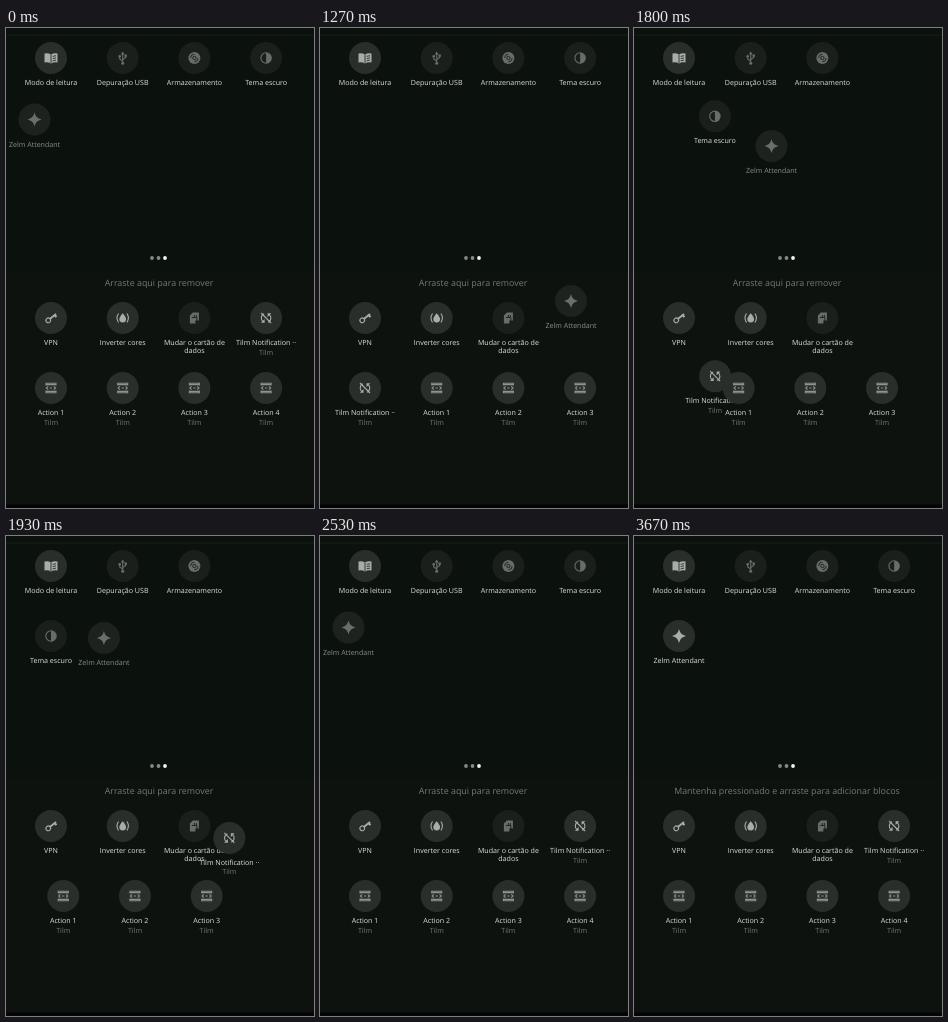
Recreate the animation shown at these times as an HTML page. Size 308 by 480 pixels, loop 5.07 s.

```html
<!DOCTYPE html>
<html lang="pt">
<head>
<meta charset="utf-8">
<title>Editor de blocos</title>
<style>
  html, body { margin: 0; width: 100%; height: 100%; overflow: hidden; background: #0b110c; }
  svg { display: block; width: 308px; height: 480px; }
  text { font-family: "Open Sans", "Noto Sans", sans-serif; text-anchor: middle; text-rendering: geometricPrecision; }
  .label { font-size: 7.1px; fill: #dde0dc; }
  .sub { font-size: 7.1px; fill: #737873; }
  #hint { font-size: 8.9px; fill: #747974; }
  .disc { fill: #292e2a; }
  .off .disc { fill: #1a1f1b; }
  .icon { fill: #a9ada9; color: #a9ada9; }
  .off .icon { fill: #686d68; color: #686d68; }
  .line { fill: none; stroke: currentColor; stroke-width: 1.1; }
  .cut { fill: none; stroke: #292e2a; stroke-width: .9; }
  .off .cut { stroke: #1a1f1b; }
</style>
</head>
<body>
<svg id="stage" viewBox="0 0 308 480">
  <rect width="308" height="480" fill="#0b110c"/>
  <rect y="243" width="308" height="233" fill="#0d120e"/>
  <rect y="6.5" width="308" height="1" fill="#1a1f1b"/>
  <rect y="476.5" width="308" height="3.5" fill="#050404"/>
  <g fill="#858a85">
    <circle cx="146" cy="230" r="1.9"/>
    <circle cx="152.5" cy="230" r="1.9"/>
    <circle cx="159" cy="230" r="1.9" fill="#f2f4f2"/>
  </g>
  <text id="hint" x="153" y="258"></text>
</svg>
<script>
const LOOP = 5070, STEP = 1000 / 15;
const stage = document.getElementById('stage');
const hint = document.getElementById('hint');

const icons = {
  book: `<path d="M-6.5-4.5Q-3-5.5 0-3.5Q3-5.5 6.5-4.5V4.5Q3 3.7 0 5.5Q-3 3.7-6.5 4.5Z"/>
    <path class="cut" d="M0-3.5V5M1.7-1.6L5-2.3M1.7.6L5-.1M1.7 2.8L5 2.1"/>`,
  usb: `<path class="line" d="M0-4V5M0 3L-3 1V-1.5M0 1.5L3-.5V-2"/>
    <path d="M0-6.5L1.9-3.6H-1.9ZM1.8-3.6H4.2V-1.2H1.8Z"/>
    <circle cx="-3" cy="-1.8" r="1.3"/><circle cy="5.2" r="1.5"/>`,
  disk: `<circle r="6"/><circle class="cut" r="1.7"/>
    <path class="cut" d="M-3.8 0A3.8 3.8 0 0 1 0-3.8M3.8 0A3.8 3.8 0 0 1 0 3.8"/>`,
  contrast: `<circle class="line" r="5.2"/><path d="M0-5.2A5.2 5.2 0 0 1 0 5.2Z"/>`,
  star: `<path d="M0-7Q1.2-1.2 7 0Q1.2 1.2 0 7Q-1.2 1.2-7 0Q-1.2-1.2 0-7Z"/>`,
  key: `<g transform="rotate(-40)"><circle class="line" cx="-3.6" r="2.3"/>
    <path d="M-1.5-.9H6.5V.9H5.8V2.8H3.6V.9H-1.5Z"/></g>`,
  drop: `<path d="M0-4.8Q3.4-.9 3.4 1A3.4 3.4 0 0 1-3.4 1Q-3.4-.9 0-4.8Z"/>
    <path class="line" d="M-4.2-4.5Q-7.2 0-4.2 4.5M4.2-4.5Q7.2 0 4.2 4.5"/>`,
  sim: `<path d="M-1.5-5.5H4.5V2.5H1V5.5H-4.5V-2.5Z"/>
    <path class="cut" d="M-2.5-.5H2.5V5M0-3V-1M2-3V-1"/>`,
  sync: `<path class="line" d="M-2-4.3A4.6 4.6 0 0 0-3 3.6M2 4.3A4.6 4.6 0 0 0 3-3.6M-5-5L5 5"/>
    <path d="M-5.2 4.8H-1.5V1ZM5.2-4.8H1.5V-1Z"/>`,
  panel: `<g opacity=".8"><path class="line" d="M-5-2.5V-4.8H5V-2.5M-5 2.5V4.8H5V2.5M-5-3.4H5M-5 3.4H5"/>
    <path class="line" d="M-2.8-1.6L-4.6 0L-2.8 1.6M2.8-1.6L4.6 0L2.8 1.6M-1.2 0H1.2"/></g>`
};

function tile(label, icon, { off = false, sub = '' } = {}) {
  const g = document.createElementNS('http://www.w3.org/2000/svg', 'g');
  const lines = label.split('|').reduce((out, s, i) =>
    out + `<text class="label" y="${27 + 8 * i}">${s}</text>`, '');
  g.setAttribute('class', off ? 'off' : 'on');
  g.innerHTML = `<circle class="disc" r="16"/><g class="icon">${icons[icon]}</g>${lines}
    <text class="sub" y="36.5">${sub}</text>`;
  stage.append(g);
  return g;
}

const off = { off: true }, sub = { sub: 'Tilm' };
const active = [
  tile('Modo de leitura', 'book'),
  tile('Depuração USB', 'usb', off),
  tile('Armazenamento', 'disk', off),
  tile('Tema escuro', 'contrast', off)
];
const spare = [
  tile('VPN', 'key'),
  tile('Inverter cores', 'drop'),
  tile('Mudar o cartão de|dados', 'sim', off),
  tile('Tilm Notification ··', 'sync', sub),
  ...[1, 2, 3, 4].map(n => tile('Action ' + n, 'panel', sub))
];
const dragged = tile('Zelm Attendant', 'star');

const slot = (i, y) => [45 + 71.7 * (i % 4), y + 70 * Math.floor(i / 4)];
const mix = (a, b, p) => a.map((v, i) => v + (b[i] - v) * p);
const ramp = (t, from, length) => Math.min(1, Math.max(0, (t - from) / length));
const ease = (t, from, length) => (1 - Math.cos(Math.PI * ramp(t, from, length))) / 2;

function place(g, [x, y], opacity = 1) {
  g.setAttribute('transform', `translate(${x.toFixed(2)} ${y.toFixed(2)})`);
  g.setAttribute('opacity', opacity);
}

// Finger path: time, x, y
const path = [
  [1200, 252, 277], [1267, 251, 273], [1400, 243, 250], [1533, 223, 211],
  [1667, 182, 156], [1800, 137.5, 118], [1933, 98, 102], [2067, 68, 96],
  [2200, 50.5, 93], [2267, 42, 92.3], [2400, 32, 91.7], [2533, 28.5, 91.5]
];

function finger(t) {
  const i = path.findIndex(k => k[0] > t);
  if (i === 0) return path[0].slice(1);
  if (i < 0) return path.at(-1).slice(1);
  const [a, b] = [path[i - 1], path[i]];
  return mix(a, b, ramp(t, a[0], b[0] - a[0])).slice(1);
}

function draw(t) {
  const intro = t < 199;
  const resting = !intro && t < 700;
  hint.textContent = resting || t > 3300
    ? 'Mantenha pressionado e arraste para adicionar blocos'
    : 'Arraste aqui para remover';

  const swap = ease(t, 1617, 250) - ease(t, 2117, 250);
  active.forEach((g, i) => place(g, mix(slot(i, 30), slot(i + 1, 30), i === 3 ? swap : 0)));

  const close = intro ? 1 : ease(t, 1722, 290);
  spare.forEach((g, i) => place(g,
    mix(slot(i < 3 ? i : i + 1, 290), slot(i, 290), close),
    i === 7 && !intro ? ramp(t, 1990, 120) : 1));

  const settle = ease(t, 3300, 350);
  if (resting) place(dragged, slot(3, 290));
  else place(dragged, mix(finger(intro ? LOOP : t), slot(4, 30), settle), 0.6 + 0.4 * settle);
}

const start = performance.now();
function tick() {
  const t = (performance.now() - start) % LOOP;
  draw(Math.floor((t + 4) / STEP) * STEP);
  requestAnimationFrame(tick);
}
tick();
</script>
</body>
</html>
```
